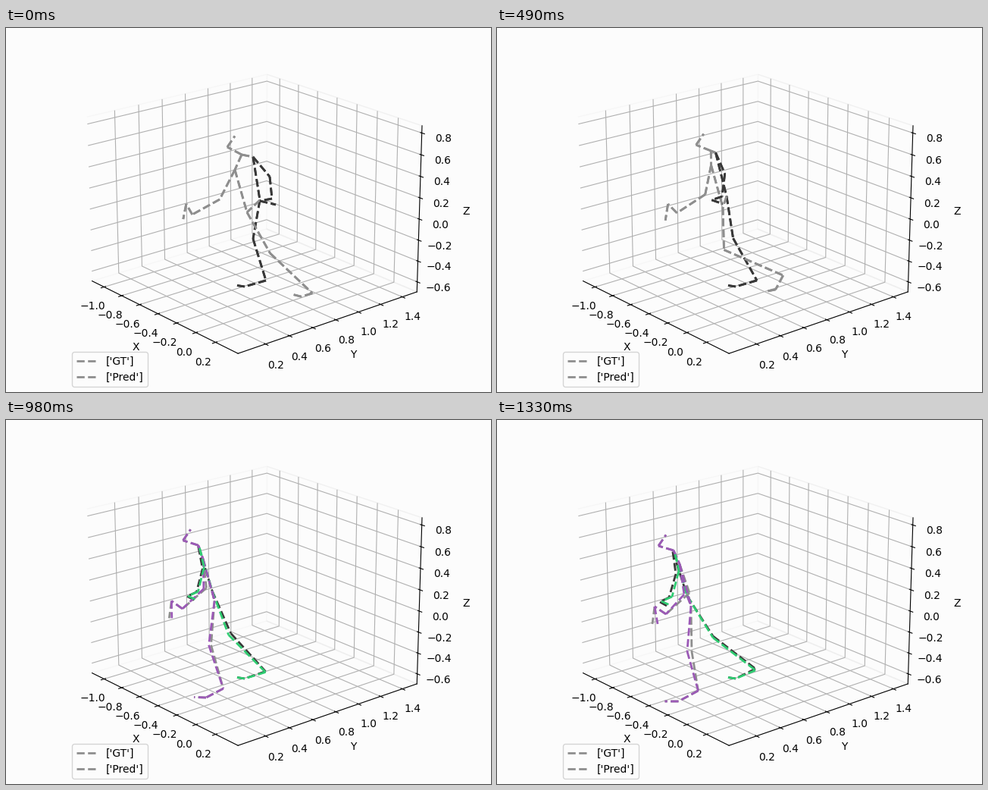
Write a matplotlib script that moves like this. It is 640x480 px and loops after 1400 ms.

```python
import numpy as np
import matplotlib.pyplot as plt
from matplotlib.animation import FuncAnimation
from matplotlib.lines import Line2D

W, H, DPI = 640, 480, 100
FRAMES, INTERVAL = 20, 70
HISTORY = 10  # observed steps before the prediction starts
BG = "#fcfcfc"
GRAY, DARK = "#8e8e8e", "#383838"
PURPLE, GREEN = "#9b59b6", "#2ecc71"

step = np.arange(FRAMES)
u = step / (FRAMES - 1)
ease_out = np.sin(np.pi * u / 2)
arc = np.sin(np.pi * u)


def turn(start, end, ease=ease_out):
    """Bone vector moving from start to end over the loop."""
    return start + (end - start) * ease


def bump(center, width):
    return np.exp(-((step - center) / width) ** 2)


def walk(miss):
    """Joint paths as complex stage pixels; miss is the growing pose error."""
    j = {}
    j["neck"] = turn(311 + 167j, 233 + 172j, u) - 7.5j * arc
    j["nose"] = j["neck"] + turn(-19 - 10j, -20 - 6j)
    j["head"] = j["nose"] + 10 - 14.5j

    j["r_shoulder"] = j["neck"] + turn(15 + 3j, -1 + 2j) + (3 + 3j) * miss
    j["r_elbow"] = j["r_shoulder"] + turn(22 + 26j, 4 + 29j) + (1 - 7j) * miss
    j["r_wrist"] = j["r_elbow"] + turn(3 + 29j, -9 + 31j) + 3j * miss
    j["r_thumb"] = j["r_wrist"] + turn(-16 + 3j, -12 + 6j) - 2 * miss
    j["r_hand"] = j["r_thumb"] + turn(21 + 5j, 9 + 5j) + 2 * miss

    lift = bump(7, 4)  # the left foot leaving the ground
    j["l_shoulder"] = j["neck"] + turn(-9 + 20j, 8 + 18j)
    j["l_elbow"] = j["l_shoulder"] + turn(-20 + 39j, 13 + 38j, u) + (-7 + 2j) * miss
    j["l_wrist"] = j["l_elbow"] + turn(-36 + 20j, -31 + 28j) - 4 * lift + (7 - 2j) * miss
    j["l_thumb"] = j["l_wrist"] + turn(-8 - 14j, -15 - 10j)
    j["l_hand"] = j["l_thumb"] + turn(-4 + 20j, -3 + 23j) + 7 * miss

    # The right foot stays planted, its heel rising at the end
    sway = 4 * miss * (1 - miss)
    j["r_hip"] = j["neck"] + turn(24 + 60j, 18 + 60j)
    j["r_ankle"] = 343 + 333j - (2 + 5j) * u ** 4 + 2j * miss
    j["r_knee"] = j["r_ankle"] + turn(-17 - 55j, -56 - 43j, u) - 5.5j * arc + (-3 + 1j) * sway
    j["r_foot"] = 315 + 341j + 0 * u
    j["r_toe"] = j["r_foot"] - 10 - 1.5j

    # The left leg swings through
    j["l_hip"] = j["neck"] + turn(7 + 76j, 23 + 73j)
    j["l_knee"] = j["l_hip"] + turn(31 + 54j, 2 + 60j, u) - 27 * bump(10, 5) - 6 * miss
    swing = 334 - 72 * np.tanh((step - 10.3) / 4.7)
    j["l_ankle"] = swing + turn(351j, 357j, u) - 27j * lift
    j["l_foot"] = j["l_ankle"] + turn(-15 + 4j, -26 + 14j, u) + (9 + 11j) * lift
    j["l_toe"] = j["l_foot"] + turn(-11 - 3j, -18 + 0j, u) + (3 + 4j) * lift
    return j


CHAINS = [
    "r_shoulder r_hip r_knee r_ankle r_foot r_toe",
    "l_shoulder l_hip l_knee l_ankle l_foot l_toe",
    "r_hip l_hip",
    "neck nose head",
    "neck l_shoulder l_elbow l_wrist l_thumb l_hand",
    "neck r_shoulder r_elbow r_wrist r_thumb r_hand",
]
BONES = [pair for chain in map(str.split, CHAINS)
         for pair in zip(chain, chain[1:])]

truth = walk(np.zeros(FRAMES))
pred = walk(np.clip((step - HISTORY + 1) / HISTORY, 0, 1))

fig = plt.figure(figsize=(W / DPI, H / DPI), dpi=DPI, facecolor=BG)

# Empty 3D box behind the figure
ax = fig.add_axes((0, 0, 1, 1), projection="3d", facecolor="none")
ax.view_init(elev=20, azim=-40)
ax.set_xticks(np.arange(-5, 2) / 5)
ax.set_yticks(np.arange(1, 8) / 5)
ax.set_zticks(np.arange(-3, 5) / 5)
half = 1.5625 / 2
ax.set_xlim(-0.358 - half, -0.358 + half)
ax.set_ylim(0.756 - half, 0.756 + half)
ax.set_zlim(0.085 - half, 0.085 + half)
ax.set_xlabel("X")
ax.set_ylabel("Y")
ax.set_zlabel("Z")
for axis in (ax.xaxis, ax.yaxis, ax.zaxis):
    axis.pane.fill = False

handles = [Line2D([], [], color=GRAY, lw=2, ls="--", label=label)
           for label in ("['GT']", "['Pred']")]
ax.legend(handles=handles, loc="lower left", facecolor=BG)

# Flat layer in stage pixels for the two skeletons
stage = fig.add_axes((0, 0, 1, 1), facecolor="none")
stage.set_xlim(0, W)
stage.set_ylim(H, 0)
stage.axis("off")


def add_skeleton():
    return [stage.plot([], [], lw=2, ls="--")[0] for _ in BONES]


truth_lines = add_skeleton()
pred_lines = add_skeleton()


def pose(lines, joints, i, left, right):
    for line, (a, b) in zip(lines, BONES):
        ends = np.array([joints[a][i], joints[b][i]])
        line.set_data(ends.real, ends.imag)
        on_right = a.startswith("r_") and b.startswith("r_")
        line.set_color(right if on_right else left)


def update(i):
    pose(truth_lines, truth, i, GRAY, DARK)
    colors = (GRAY, DARK) if i < HISTORY else (PURPLE, GREEN)
    pose(pred_lines, pred, i, *colors)
    return truth_lines + pred_lines


anim = FuncAnimation(fig, update, frames=FRAMES, interval=INTERVAL,
                     repeat=True, repeat_delay=0, blit=False)
plt.show()
```
